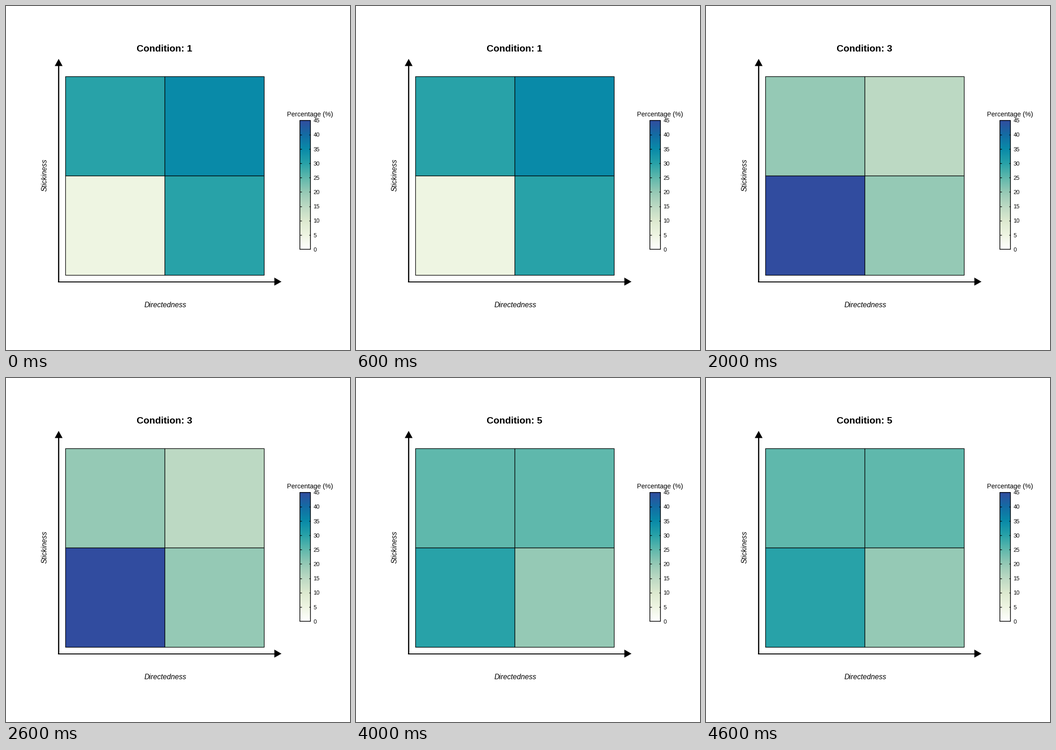
A matplotlib script for the animation above (5 s loop, 748 by 748 pixels).

```python
import numpy as np
import matplotlib.pyplot as plt
from matplotlib.animation import FuncAnimation
from matplotlib.colors import LinearSegmentedColormap
from matplotlib.patches import Polygon, Rectangle

SIZE, DPI = 748, 100
PX = 72 / DPI  # points per pixel
plt.rcParams["font.family"] = "Liberation Sans"

# One colour per 5 percent, from 0 to 45
STOPS = ["#ffffff", "#eef5e2", "#dce9cf", "#bcd9c3", "#95c9b5",
         "#5fb8ac", "#28a2a8", "#098aa8", "#146ca4", "#314c9f"]
cmap = LinearSegmentedColormap.from_list("percent", STOPS, N=1024)

# Percentages per condition: top left, top right, bottom left, bottom right
DATA = [
    (30, 35, 5, 30),
    (10, 20, 25, 45),
    (20, 15, 45, 20),
    (30, 20, 25, 25),
    (25, 25, 30, 20),
]
LEFT, TOP, CELL = 129, 153, 216
BAR_X, BAR_Y, BAR_W, BAR_H = 639.5, 248.5, 23, 280.5

fig = plt.figure(figsize=(SIZE / DPI, SIZE / DPI), dpi=DPI, facecolor="white")
ax = fig.add_axes([0, 0, 1, 1])
ax.axis("off")


def line(x0, y0, x1, y1, width):
    ax.plot([x0, x1], [y0, y1], color="black", lw=width * PX,
            solid_capstyle="butt")


def label(x, y, text, size, **kw):
    kw = {"va": "baseline", **kw}
    return ax.text(x, y, text, fontsize=size * PX, color="black", **kw)


# Heat map
cells = []
for k in range(4):
    row, col = divmod(k, 2)
    cell = Rectangle((LEFT + col * CELL, TOP + row * CELL), CELL, CELL,
                     ec="black", lw=1.3 * PX)
    cells.append(ax.add_patch(cell))

# Axis arrows
line(114.5, 600, 114.5, 125, 2.6)
line(113.5, 599.5, 590, 599.5, 2)
for tip in ([(114.5, 115), (106, 130.5), (123, 130.5)],
            [(599, 599.5), (583.5, 590.5), (583.5, 608)]):
    ax.add_patch(Polygon(tip, fc="black", lw=0))

# Colour bar
ax.imshow(np.linspace(45, 0, 512)[:, None], cmap=cmap, vmin=0, vmax=45,
          extent=(BAR_X, BAR_X + BAR_W, BAR_Y + BAR_H, BAR_Y),
          aspect="auto", interpolation="bilinear")
ax.add_patch(Rectangle((BAR_X, BAR_Y), BAR_W, BAR_H, fill=False,
                       ec="black", lw=1.5 * PX))
for value in range(0, 50, 5):
    y = BAR_Y + BAR_H * (1 - value / 45)
    if 0 < value < 45:
        line(BAR_X, y, BAR_X + 3.5, y, 1.3)
        line(BAR_X + BAR_W - 3.5, y, BAR_X + BAR_W, y, 1.3)
    label(668.6, y + 4.8, str(value), 12.2)

# Text
label(611, 240.3, "Percentage (%)", 14.4)
label(346, 655, "Directedness", 15.6, style="italic", ha="center")
label(89, 368, "Stickiness", 15.6, style="italic", rotation=90,
      rotation_mode="anchor", ha="center")
title = label(284, 99.3, "", 20.8, weight="bold")

ax.set_xlim(0, SIZE)
ax.set_ylim(SIZE, 0)


def update(i):
    title.set_text(f"Condition: {i + 1}")
    for cell, value in zip(cells, DATA[i]):
        cell.set_facecolor(cmap(value / 45))
    return [title, *cells]


anim = FuncAnimation(fig, update, frames=len(DATA), interval=1000,
                     repeat=True, repeat_delay=0, blit=False)
plt.show()
```
